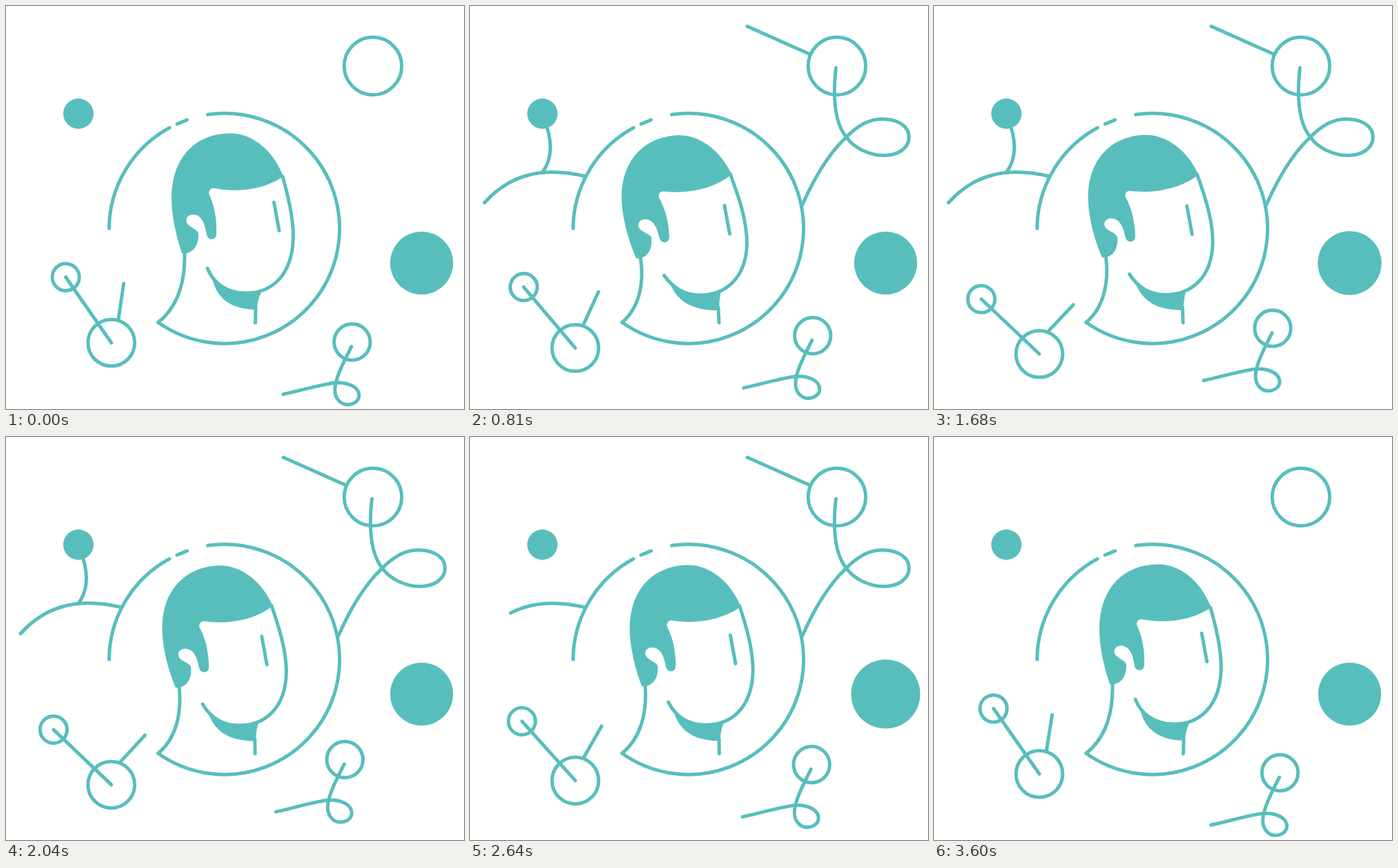
Recreate the animation shown at these times as an HTML page. Size 664 px wide and 584 px high, loop 3.63 s.

```html
<!DOCTYPE html>
<html lang="en">
<head>
<meta charset="utf-8">
<title>Connected profile</title>
<style>
  html, body { margin: 0; width: 100%; height: 100%; overflow: hidden; background: #fff; }
  svg { display: block; width: 664px; height: 584px; }
  .line { fill: none; stroke: #58bebc; stroke-width: 5; stroke-linecap: round; stroke-linejoin: round; }
  .solid { fill: #58bebc; }
</style>
</head>
<body>
<svg viewBox="0 0 664 584">
  <g class="line">
    <path d="M292.500 157.300A166.800 166.800 0 1 1 220.500 458.500"/>
    <path d="M149.500 322.500A167 167 0 0 1 237 176.500M248 171L262.500 165"/>
    <circle cx="532" cy="87" r="41.700"/>
    <path id="vine" pathLength="1" d="M481 290C498.500 250 521 213 545.500 190C572 163 592 163 602 164C622 165 636.500 175 636.500 190C636.500 205 622 216.500 600 216.500C578 216.500 556 205 545.500 190C531 172 525 138 530.500 89.500"/>
    <path id="ray" pathLength="1" d="M492 69.500L402 29.500"/>
    <path id="branch" pathLength="1" d="M21 285C58 244 105 232 168 247"/>
    <path id="stem" pathLength="1" d="M105 241C119 222 119 200 112 177"/>
  </g>
  <circle class="solid" cx="105" cy="156" r="22"/>
  <circle class="solid" id="pulse" cx="602.600" cy="372.500" r="45.600"/>

  <g id="molecule" class="line">
    <circle r="33.800"/>
    <g id="arm">
      <path d="M0 0V-115.700"/>
      <circle cy="-115.700" r="19.600"/>
    </g>
    <path id="stub" d="M0 0V-53"/>
  </g>

  <g id="swirl" class="line">
    <circle cx="502" cy="487.300" r="26.200"/>
    <path d="M501 494C490 516 478 538 477 556C477 570 486 578 495 578C505 578 512 572 512 565C512 553 498 546 480 546C458 548 430 557 402 563"/>
  </g>

  <path id="shade" class="solid"/>
  <path id="nape" class="line"/>
  <path id="throat" class="line"/>
  <path id="jaw" class="line"/>
  <path id="hair" class="solid" d="M402 247C388 210 358 184.500 325 184.500C276 184.500 240 219 240 278C240 305 247 335 255 358C268 360 280 350 279 329C276 322 262 320 261.500 311C261.500 302 274 299 282 307C288 314 289 322 291 332C293 340 304 340 305 331C306 309 302 288 294 272C294 267 297 264 301 264C335 271 375 266 402 247Z"/>
  <path id="eye" class="line" d="M388.500 284.500L396 325.500"/>
</svg>
<script>
const LOOP = 3630;
const el = {};
document.querySelectorAll('[id]').forEach(n => el[n.id] = n);

const ramp = (t, a, b) => Math.min(1, Math.max(0, (t - a) / (b - a)));
const ease = x => (1 - Math.cos(Math.PI * x)) / 2;
const mix = (a, b, u) => a + (b - a) * u;
const put = (node, value) => node.setAttribute('transform', value);

// Linear track through [time, value] steps
function track(steps, t) {
  let i = 1;
  while (i < steps.length - 1 && t > steps[i][0]) i++;
  const [t0, a] = steps[i - 1], [t1, b] = steps[i];
  return mix(a, b, ramp(t, t0, t1));
}

// Blend two paths that share their commands
function blend(node, from, to, u) {
  const goal = to.match(/[\d.]+/g);
  let i = 0;
  node.setAttribute('d', from.replace(/[\d.]+/g, n => mix(+n, +goal[i++], u).toFixed(2)));
}

// Show only the part of a line between a and b
function trim(node, a, b) {
  node.style.visibility = b - a > 0.001 ? 'visible' : 'hidden';
  node.style.strokeDasharray = `${b - a} 3`;
  node.style.strokeDashoffset = -a;
}

const grown = (t, in0, in1, out0, out1) => ramp(t, in0, in1) - ramp(t, out0, out1);

const TURN = [[30, 0], [780, 1], [1260, 1], [3630, 0]];
const EYE_X = [[30, 0], [780, -19.5], [810, -19.5], [1260, -26.5], [3630, 0]];
const EYE_Y = [[30, 0], [780, 4.8], [810, 4.8], [1260, 6.5], [3630, 0]];

function draw(t) {
  // Steady sway there and back
  const p = (t - 30 + LOOP) % LOOP;
  const sway = 1 - Math.abs(1 - 2 * p / LOOP);
  put(el.molecule, `translate(152.700 ${mix(487.7, 505.9, sway)})`);
  put(el.arm, `rotate(${-mix(34.6, 47.8, sway)})`);
  put(el.stub, `translate(${mix(10.2, 13.1, sway)} ${mix(-33.3, -32.7, sway)}) rotate(${mix(7.7, 46.9, sway)})`);
  put(el.swirl, `translate(${-12 * sway} ${-22.3 * sway})`);

  const beat = t % (LOOP / 3);
  el.pulse.setAttribute('r', 45.6 + 4.9 * (ease(ramp(beat, 0, 135)) - ease(ramp(beat, 135, 570))));

  trim(el.vine, 0, grown(t, 30, 465, 2970, 3450));
  trim(el.ray, 0, grown(t, 465, 735, 2700, 2970));
  trim(el.stem, 0, grown(t, 660, 790, 2430, 2550));
  trim(el.branch, ramp(t, 2550, 2850), ramp(t, 490, 790));

  const turn = track(TURN, t);
  put(el.hair, `rotate(${-4.3 * turn} 352 547)`);
  put(el.eye, `translate(${track(EYE_X, t)} ${track(EYE_Y, t)})`);
  blend(el.jaw, 'M401 247C412 285 416.500 310 416.500 335C415 392 384 416 348 416C318 416 300 400 292 380',
    'M377 243C391 280 401.500 312 401.500 345C400 395 370 419 333 419C309 419 293 407 281.500 390.500', turn);
  blend(el.shade, 'M299 394C312 412 340 420 371 413Q364 427 364 440C335 440 306 430 299 394Z',
    'M290 402C306 417 335 423 364 413Q361 427 361 441C330 441 303 434 290 402Z', turn);
  blend(el.nape, 'M259 358C260 405 246 438 220.500 458.500', 'M247 364C253 400 246 437 220.500 458.500', turn);
  blend(el.throat, 'M362 437L361.500 459', 'M360 437L361 459', turn);
}

const start = performance.now();
function tick() {
  draw((performance.now() - start) % LOOP);
  requestAnimationFrame(tick);
}
draw(0);
requestAnimationFrame(tick);
</script>
</body>
</html>
```
